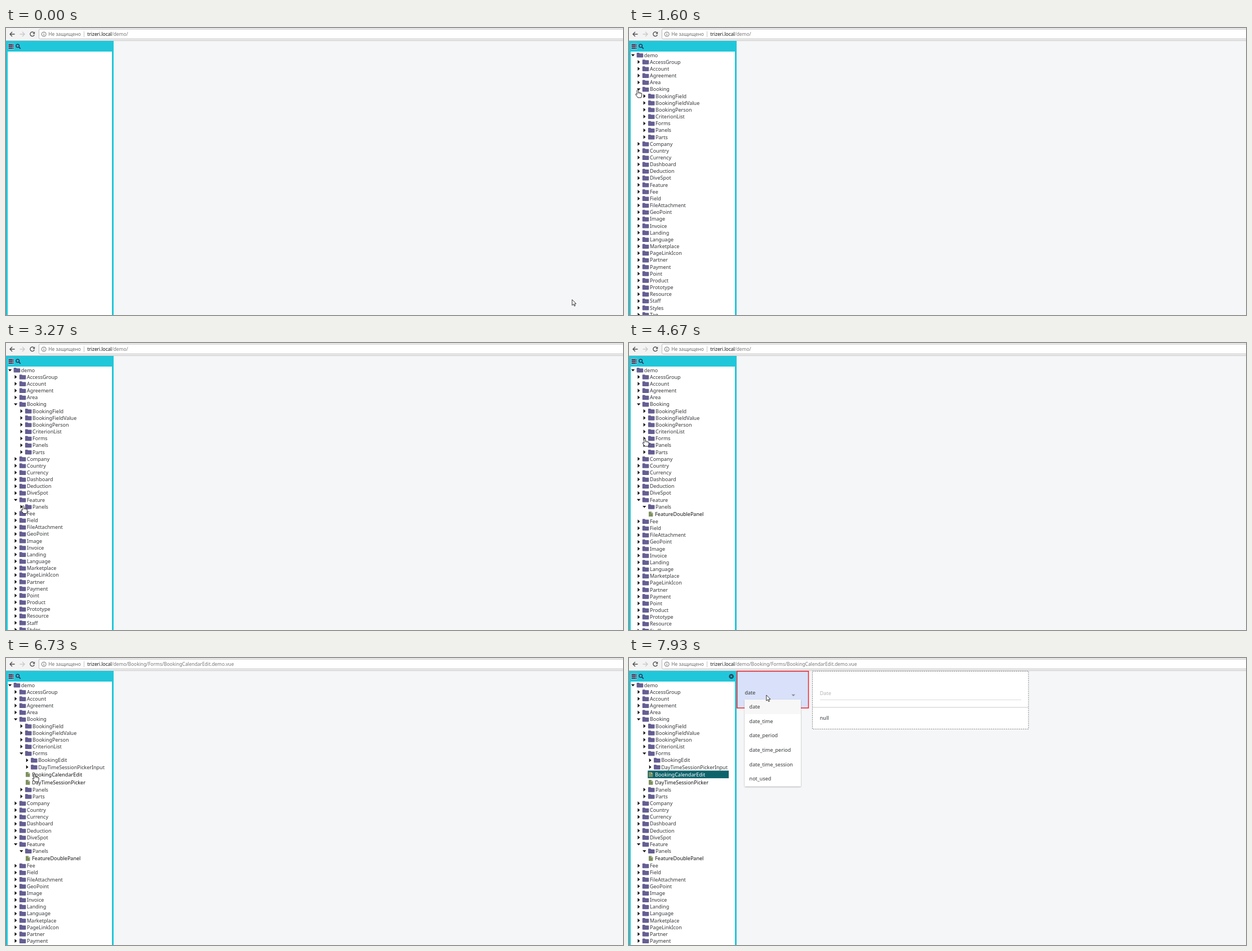
Recreate the animation shown at these times as an HTML page. Size 1095 by 511 pixels, loop 8000 ms.

```html
<!DOCTYPE html>
<html lang="ru">
<head>
<meta charset="utf-8">
<title>Component tree</title>
<style>
  html, body { margin: 0; width: 100%; height: 100%; overflow: hidden; }
  svg { display: block; width: 1095px; height: 511px; }
  text { font: 9px "Noto Sans", "Open Sans", sans-serif; fill: #333539; }
  .bar text { font-size: 8.4px; }
  .file { fill: #111; }
</style>
</head>
<body>
<svg viewBox="0 0 1095 511" xmlns="http://www.w3.org/2000/svg">
  <defs>
    <path id="folder" fill="#655f93" d="M1-4.3H4.2L5.4-3.1H10.6Q11.6-3.1 11.6-2.1V3.3Q11.6 4.3 10.6 4.3H1Q0 4.3 0 3.3V-3.3Q0-4.3 1-4.3Z"/>
    <g id="file">
      <path fill="#7f9060" d="M.6-4.4H4.7L7.4-1.7V3.9Q7.4 4.4 6.9 4.4H.6Q0 4.4 0 3.9V-3.9Q0-4.4.6-4.4Z"/>
      <path fill="#d3dbc2" d="M4.4-3.9V-1.3H7Z"/>
    </g>
    <path id="closed" fill="#111" d="M-1.7-3.4L2.2 0L-1.7 3.4Z"/>
    <path id="open" fill="#111" d="M-3.2-1.6H3.2L0 2.1Z"/>
    <filter id="shadow" x="-10%" y="-10%" width="120%" height="120%">
      <feDropShadow dx="0" dy="1" stdDeviation="1.3" flood-opacity=".35"/>
    </filter>
  </defs>

  <rect width="1095" height="511" fill="#f5f6f8"/>
  <g class="bar">
    <rect width="1095" height="23" fill="#f3f3f3"/>
    <rect x="58.5" y="2" width="1045" height="17.5" rx="2" fill="#fff" stroke="#bcbcbc"/>
    <path d="M0 22.5H1095" stroke="#c3c3c3"/>
    <g fill="none" stroke-width="1.4">
      <path stroke="#505050" d="M15.5 11H7.5M11 7L7 11L11 15"/>
      <path stroke="#c9c9c9" d="M24.5 11H32.5M29 7L33 11L29 15"/>
      <path stroke="#505050" d="M49.6 8.4A3.8 3.8 0 1 0 50.3 12"/>
    </g>
    <path fill="#505050" d="M51.2 6.6V10.6H47.2Z"/>
    <circle cx="67.2" cy="11" r="4" fill="none" stroke="#666" stroke-width=".9"/>
    <path d="M67.2 10.3V13.3M67.2 8.5V9.5" stroke="#666"/>
    <text x="75.3" y="14" style="fill:#6c6c6c">Не защищено</text>
    <path d="M138.5 6V16" stroke="#c4c4c4"/>
    <text x="144.3" y="14" style="fill:#777"><tspan fill="#111">trizeri.local</tspan><tspan id="path"></tspan></text>
  </g>

  <rect y="23" width="191" height="488" fill="#20c7da"/>
  <rect x="3" y="42" width="185" height="469" fill="#fff"/>
  <rect x="3.6" y="27.6" width="10.8" height="10.2" fill="#a9dfe6"/>
  <path d="M4.4 29.6H13.8M4.4 32.7H13.8M4.4 35.8H13.8" stroke="#3c3558" stroke-width="2.3"/>
  <path d="M11.5 29.6H12.7M11.5 32.7H12.7M11.5 35.8H12.7" stroke="#cfe9ee" stroke-width=".8"/>
  <circle cx="20.7" cy="31.8" r="2.8" fill="none" stroke="#34375a" stroke-width="1.5"/>
  <path d="M22.8 33.9L25.7 36.8" stroke="#34375a" stroke-width="1.9"/>

  <g id="tree"></g>

  <g id="panel">
    <circle cx="181.6" cy="32.8" r="4.3" fill="#2c4257"/>
    <path d="M180 31.2L183.2 34.4M183.2 31.2L180 34.4" stroke="#20c7da" stroke-width="1.1"/>
    <rect x="191.8" y="23.6" width="126.7" height="65.4" fill="#d8e1f9" stroke="#f3202b" stroke-width="1.5"/>
    <text x="205.4" y="65.2">date</text>
    <path fill="#8d919b" d="M288.4 64.8H295L291.7 68.2Z"/>
    <rect x="325.5" y="23.5" width="383.5" height="103" fill="#fff"/>
    <path d="M326 87.9H709" stroke="#c9c9c9"/>
    <rect x="325.5" y="23.5" width="383.5" height="103" fill="none" stroke="#8f8f8f" stroke-dasharray="2.4 1.4"/>
    <path d="M339 74.5H696" stroke="#dcdcdc"/>
    <text x="338.8" y="66" style="fill:#b3b3b3">Date</text>
    <text x="338.8" y="110.4">null</text>
  </g>
  <g id="menu">
    <rect x="205.4" y="74" width="99.6" height="154.4" rx="1" fill="#fff" filter="url(#shadow)"/>
    <rect x="205.4" y="74" width="99.6" height="26" fill="#f7f7f7"/>
  </g>

  <g id="cursor" stroke-linejoin="round">
    <path id="arrow" fill="#fff" stroke="#222" stroke-width=".9" d="M0 0V10.2L2.4 8L4 11.6L5.6 10.9L4.1 7.4H7.2Z"/>
    <g id="hand">
      <path fill="#fff" stroke="#111" stroke-width=".9" d="M-1.3 8.4V1.2Q-1.3 0 0 0T1.3 1.2V5Q3 4.2 3.5 5.4Q5 4.8 5.5 6Q7 5.6 7.2 7.2V10Q7 12 6 14H0Q-.5 12.5-2 11L-3.7 8.6Q-3.8 6.9-2.4 7.4Z"/>
      <path fill="none" stroke="#111" stroke-width=".6" d="M1.3 5V7.2M3.5 5.6V7.4M5.5 6.2V7.6"/>
    </g>
  </g>
</svg>

<script>
const LOOP = 8000, STEP = 200 / 3;
const ROW = 12.16, FILE_ROW = 14, INDENT = 10.15;
const $ = id => document.getElementById(id);

// Times at which something is clicked or appears
const OPENED = { 'Booking': 1600, 'Feature': 2730, 'Feature/Panels': 3530, 'Booking/Forms': 5600 };
const LINK_AT = 6730, PANEL_AT = 6870, MENU_AT = 7930;

const roots = ('AccessGroup Account Agreement Area Booking Company Country Currency Dashboard ' +
  'Deduction DiveSpot Feature Fee Field FileAttachment GeoPoint Image Invoice Landing Language ' +
  'Marketplace PageLinkIcon Partner Payment Point Product Prototype Resource Staff Styles Tag Tax User').split(' ');

// A leading dot marks a file
const children = {
  'Booking': ['BookingField', 'BookingFieldValue', 'BookingPerson', 'CriterionList', 'Forms', 'Panels', 'Parts'],
  'Booking/Forms': ['BookingEdit', 'DayTimeSessionPickerInput', '.BookingCalendarEdit', '.DayTimeSessionPicker'],
  'Feature': ['Panels'],
  'Feature/Panels': ['.FeatureDoublePanel']
};

// Pointer moves: start, end, destination, optional sideways bulge
const moves = [
  [0, 200, 318, 268],
  [467, 1270, 15.5, 110],
  [1733, 2130, 9, 281, 10],
  [2200, 2530, 13, 279],
  [3000, 3270, 30.5, 289.5],
  [4067, 4670, 28, 170],
  [5533, 5600, 30.3, 170.5],
  [5600, 6330, 51, 206.5],
  [6800, 7530, 243.8, 66]
];
const HAND_FROM = 1190, HAND_TO = 6930;

const use = (id, x, y) => `<use href="#${id}" x="${x}" y="${y}"/>`;
const label = (x, y, s, attrs = '') => `<text x="${x}" y="${y + 3.3}" ${attrs}>${s}</text>`;

function treeMarkup(isOpen, selected) {
  let top = 42.2, out = '';

  function folder(name, depth, open) {
    const y = top + ROW / 2, x = depth * INDENT;
    top += ROW;
    out += use(open ? 'open' : 'closed', 7 + x, y) + use('folder', 13.6 + x, y) + label(26.8 + x, y, name);
  }

  function file(name) {
    const y = top + FILE_ROW / 2, on = name === selected;
    top += FILE_ROW;
    if (on) out += `<rect x="33.3" y="${y - 6.8}" width="143.7" height="13.6" fill="#0e636b"/>`;
    out += use('file', 35, y) + label(46.2, y, name, on ? 'style="fill:#fff"' : 'class="file"');
  }

  function list(names, path, depth) {
    for (const name of names) {
      if (name[0] === '.') { file(name.slice(1)); continue; }
      const key = path + name, open = isOpen(key);
      folder(name, depth, open);
      if (open) list(children[key], key + '/', depth + 1);
    }
  }

  folder('demo', 0, true);
  list(roots, '', 1);
  return out;
}

function pointerAt(t) {
  let x = 1006, y = 484;
  for (const [start, end, toX, toY, bulge = 0] of moves) {
    if (t < start) break;
    const p = Math.min(1, (t - start) / (end - start));
    const e = p * p * (3 - 2 * p);
    x += (toX - x) * e + bulge * Math.sin(Math.PI * p);
    y += (toY - y) * e;
  }
  return [x, y];
}

const show = (id, on) => $(id).setAttribute('visibility', on ? 'visible' : 'hidden');
let drawnTree = '';

function draw(time) {
  const t = Math.floor((time % LOOP + 4) / STEP) * STEP + 5;
  const isOpen = key => t >= OPENED[key];
  const selected = t >= PANEL_AT ? 'BookingCalendarEdit' : '';

  const state = Object.keys(OPENED).filter(isOpen).join() + selected;
  if (state !== drawnTree) {
    $('tree').innerHTML = treeMarkup(isOpen, selected);
    drawnTree = state;
  }

  $('path').textContent = '/demo/' + (t >= LINK_AT ? 'Booking/Forms/BookingCalendarEdit.demo.vue' : '');
  show('panel', t >= PANEL_AT);
  show('menu', t >= MENU_AT);

  const hand = t >= HAND_FROM && t < HAND_TO;
  show('hand', hand);
  show('arrow', !hand);
  $('cursor').setAttribute('transform', `translate(${pointerAt(t)})`);
}

$('menu').innerHTML += ['date', 'date_time', 'date_period', 'date_time_period', 'date_time_session', 'not_used']
  .map((s, i) => label(213.6, 87 + i * 25.55, s)).join('');

const begin = performance.now();
function tick() {
  draw(performance.now() - begin);
  requestAnimationFrame(tick);
}
tick();
</script>
</body>
</html>
```
